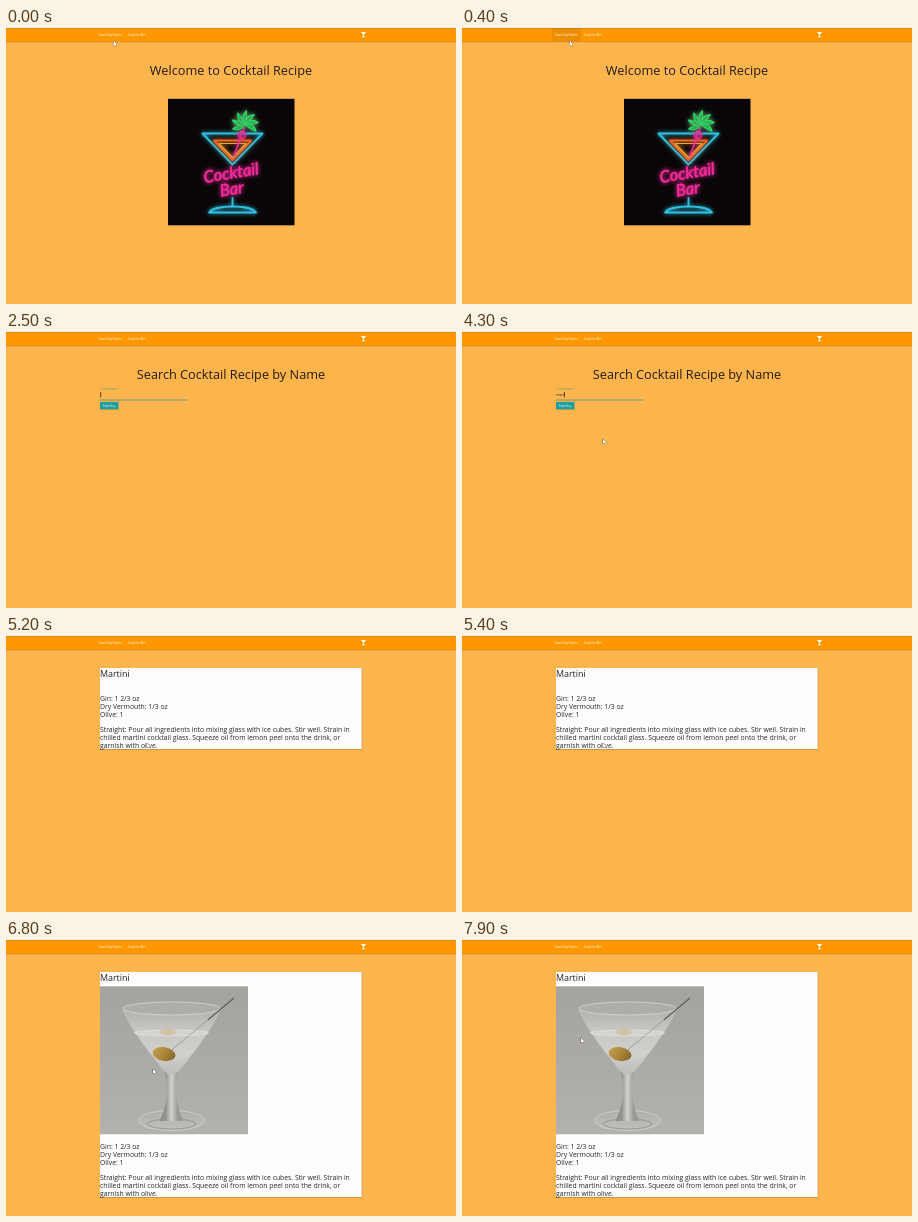
Write an HTML page with a canvas that moves like this. It is 450 px wide and 276 px high and loops after 8 s.

```html
<!DOCTYPE html>
<html lang="en">
<head>
<meta charset="utf-8">
<title>Cocktail Recipe</title>
<style>
html, body { margin: 0; width: 100%; height: 100%; overflow: hidden; background: #fcb54d; }
canvas { display: block; width: 450px; height: 276px; }
</style>
</head>
<body>
<canvas id="stage" width="450" height="276"></canvas>
<script>
const ctx = document.getElementById('stage').getContext('2d');
const LOOP = 8000, STEP = 100;
const SANS = '"Open Sans", "Noto Sans", sans-serif';
const INK = '#241b14';

const SEARCH_AT = 1600, FOCUS_AT = 2300, TYPE_AT = 3700, CARD_AT = 5200, PHOTO_AT = 5600;
const KEY_GAP = 200;

// Arrival times of the pointer; it travels at one speed and rests in between.
const MS_PER_PX = 7;
const STOPS = [
  { at: 1600, x: 115, y: 50 },
  { at: 2000, x: 80, y: 61 },
  { at: 2800, x: 141, y: 107 },
  { at: 5700, x: 149, y: 110 },
  { at: 6100, x: 180, y: 139 },
  { at: 7400, x: 65, y: 104 },
  { at: 7900, x: 119, y: 98 }
];

const clamp = v => Math.min(1, Math.max(0, v));
const mix = (a, b, k) => a + (b - a) * k;

function text(str, x, y, size, color, align = 'left') {
  ctx.font = `${size}px ${SANS}`;
  ctx.textAlign = align;
  ctx.fillStyle = color;
  ctx.fillText(str, x, y);
}

function rect(x, y, w, h, color) {
  ctx.fillStyle = color;
  ctx.fillRect(x, y, w, h);
}

function stroke(color, width) {
  ctx.strokeStyle = color;
  ctx.lineWidth = width;
  ctx.stroke();
}

function fill(color) {
  ctx.fillStyle = color;
  ctx.fill();
}

function line(x0, y0, x1, y1, color, width) {
  ctx.beginPath();
  ctx.moveTo(x0, y0);
  ctx.lineTo(x1, y1);
  stroke(color, width);
}

// Isosceles triangle with a level top edge, pointing down.
function cone(x, top, halfWidth, height) {
  ctx.beginPath();
  ctx.moveTo(x - halfWidth, top);
  ctx.lineTo(x + halfWidth, top);
  ctx.lineTo(x, top + height);
  ctx.closePath();
}

function oval(x, y, rx, ry, angle = 0) {
  ctx.beginPath();
  ctx.ellipse(x, y, rx, ry, angle, 0, Math.PI * 2);
}

function gradient(x0, y0, x1, y1, ...colors) {
  const g = ctx.createLinearGradient(x0, y0, x1, y1);
  colors.forEach((c, i) => g.addColorStop(i / (colors.length - 1), c));
  return g;
}

function drawNav(t) {
  rect(0, 0, 450, 13.5, '#ff9800');
  rect(0, 0, 450, 0.5, 'rgba(110,70,10,.4)');
  rect(0, 13.5, 450, 1.5, gradient(0, 13.5, 0, 15, 'rgba(150,85,0,.4)', 'rgba(150,85,0,0)'));
  if (t < SEARCH_AT) rect(90, 0, 29, 13.5, `rgba(0,0,0,${0.07 * clamp(t / 400)})`);
  text('Search by Name', 93, 8, 3.03, '#fff');
  text('Surprise Me!', 122, 8, 3.03, '#fff');
  cone(357.5, 4, 2.5, 3.2);
  fill('#fff');
  line(357.5, 6, 357.5, 9, '#fff', 0.8);
  line(355.8, 8.8, 359.2, 8.8, '#fff', 0.8);
}

function neon(color, width) {
  ctx.shadowColor = color;
  stroke(color, width);
}

function drawPalm(x, y) {
  const leaves = 7;
  for (let i = 0; i < leaves; i++) {
    ctx.save();
    ctx.translate(x, y);
    ctx.rotate(mix(-3.6, 0.5, i / (leaves - 1)));
    ctx.beginPath();
    ctx.moveTo(0, 0);
    ctx.quadraticCurveTo(7, -5, 13, 1);
    ctx.quadraticCurveTo(7, 2, 0, 0);
    fill('#0f8f3c');
    neon('#27dd62', 1.3);
    ctx.restore();
  }
}

function drawNeonWords() {
  ctx.save();
  ctx.translate(226, 150.5);
  ctx.rotate(-0.16);
  ctx.font = 'italic 16.5px "Lato", sans-serif';
  ctx.textAlign = 'center';
  ctx.fillStyle = ctx.strokeStyle = ctx.shadowColor = '#f22c9c';
  ctx.lineWidth = 0.6;
  ['Cocktail', 'Bar'].forEach((word, i) => {
    ctx.fillText(word, -2 * i, 16 * i);
    ctx.strokeText(word, -2 * i, 16 * i);
  });
  ctx.restore();
}

function drawNeonSign() {
  const x = 226.5, cyan = '#2fbfe0', pink = '#ef2b94';
  rect(162, 70.8, 126.5, 126.5, '#0a0607');
  ctx.save();
  ctx.lineJoin = ctx.lineCap = 'round';
  ctx.shadowBlur = 4;

  cone(x, 105.5, 30, 31);
  neon(cyan, 1.8);
  cone(x, 112.5, 18.5, 19.5);
  neon('#ee6424', 2);
  cone(x, 115.5, 13.5, 14);
  neon('#e9a83a', 1.2);

  ctx.shadowColor = cyan;
  line(x, 170, x, 178, cyan, 1.8);
  ctx.beginPath();
  ctx.moveTo(x - 23.5, 184.5);
  ctx.bezierCurveTo(x - 18, 176.5, x + 18, 176.5, x + 23.5, 184.5);
  ctx.closePath();
  neon(cyan, 1.8);

  ctx.shadowColor = pink;
  line(238, 100, 228, 128, pink, 1.6);
  oval(236, 107, 3.5, 3.5);
  neon(pink, 1.5);
  drawPalm(239, 96);
  drawNeonWords();
  ctx.restore();
}

function drawTitle(str) {
  text(str, 225, 47.2, 12.72, INK, 'center');
}

function drawHome() {
  drawTitle('Welcome to Cocktail Recipe');
  drawNeonSign();
}

function drawField(t) {
  const rise = clamp((t - FOCUS_AT + STEP) / 200);
  text('Cocktail Name', 94.5, mix(64, 58, rise), mix(3.3, 2.6, rise), '#6f9f70');
  rect(94, 67.5, 87, 1, 'rgba(38,136,125,.65)');
  const typed = 'martini'.slice(0, Math.max(0, Math.floor((t - TYPE_AT) / KEY_GAP) + 1));
  text(typed, 94.3, 64.3, 3.5, INK);
  if (t < 3300 || typed) rect(94.3 + ctx.measureText(typed).width, 60, 0.8, 5.5, '#3b2a16');
}

function drawSearch(t) {
  drawTitle('Search Cocktail Recipe by Name');
  if (t >= FOCUS_AT) {
    drawField(t);
  } else {
    text('Cocktail Name', 96, 64.5, 3.1, '#d2a45a');
    rect(94, 67.5, 87, 0.8, '#e0a450');
  }
  rect(94, 77, 18.5, 0.8, 'rgba(110,75,20,.4)');
  rect(94, 70, 18.5, 7.2, '#209fa0');
  text('Search ▸', 97, 74.8, 3.1, '#fff');
}

function drawGlassFoot(x) {
  oval(x, 180.5, 33, 10);
  fill(gradient(0, 170, 0, 191, '#b0aeab', '#c2c0bd'));
  stroke('#cfcdca', 0.9);
  oval(x, 184, 24, 5);
  stroke('rgba(120,118,115,.5)', 1);

  ctx.beginPath();
  ctx.moveTo(x - 7, 130);
  ctx.quadraticCurveTo(x, 156, x - 12, 181);
  ctx.lineTo(x + 12, 181);
  ctx.quadraticCurveTo(x, 156, x + 7, 130);
  fill(gradient(x - 6, 0, x + 6, 0, '#92908e', '#d2d0cd', '#9b9996'));
}

function drawBowl(x, rim, level) {
  const halfWidth = 48.5;
  ctx.beginPath();
  ctx.moveTo(x - halfWidth, rim);
  ctx.quadraticCurveTo(x - 44, 86, x - 8, 130);
  ctx.quadraticCurveTo(x, 138, x + 8, 130);
  ctx.quadraticCurveTo(x + 44, 86, x + halfWidth, rim);
  ctx.closePath();
  fill(gradient(0, rim, 0, 136, '#b2b1ae', '#c8c7c4', '#d2d0cc', '#bcbab7'));
  stroke('#c6c4c1', 0.8);
  oval(x, level, 37, 3);
  fill('#d6d4d0');
  stroke('#e2e1de', 0.7);
  oval(x, rim, halfWidth, 6.5);
  fill('#aeadaa');
  stroke('#d4d3d0', 0.9);
}

function drawMartini() {
  const left = 94, top = 46.3, size = 148, x = 165.5;
  rect(left, top, size, size, gradient(0, top, 0, top + size, '#a5a3a0', '#b3b1ad'));
  drawGlassFoot(x);
  drawBowl(x, 68.5, 93);
  oval(162, 92, 8, 3.4);
  fill('#cfc4a6');
  line(228, 58, 162, 113, 'rgba(105,102,98,.5)', 0.9);
  line(228, 58, 202, 79.7, '#62605e', 1.2);
  oval(158, 114, 11.5, 6.8, 0.15);
  fill(gradient(148, 108, 168, 121, '#c3a055', '#ad8537', '#86652c'));
}

function drawCard(t) {
  const hasPhoto = t >= PHOTO_AT;
  const shift = hasPhoto ? 144 : 0;
  const ink = '#262626';
  rect(94, 32, 262.2, 81.7 + shift, 'rgba(115,75,20,.45)');
  rect(94, 32, 261.7, 81 + shift, '#fdfdfd');
  text('Martini', 94, 41.2, 8.9, ink);
  if (hasPhoto) drawMartini();
  [
    'Gin: 1 2/3 oz',
    'Dry Vermouth: 1/3 oz',
    'Olive: 1',
    '',
    'Straight: Pour all ingredients into mixing glass with ice cubes. Stir well. Strain in',
    'chilled martini cocktail glass. Squeeze oil from lemon peel onto the drink, or',
    'garnish with olive.'
  ].forEach((str, i) => text(str, 94, 65 + 7.78 * i + shift, 6.84, ink));
}

function pointerAt(t) {
  let { x, y } = STOPS[0];
  for (const stop of STOPS) {
    const travel = MS_PER_PX * Math.hypot(stop.x - x, stop.y - y) || 1;
    const k = clamp(1 + (t - stop.at) / travel);
    x = mix(x, stop.x, k);
    y = mix(y, stop.y, k);
    if (k < 1) break;
  }
  return { x, y };
}

function drawHand(x, y) {
  ctx.beginPath();
  ctx.roundRect(x, y, 1.2, 3, 0.5);
  ctx.roundRect(x - 0.7, y + 2, 3, 2.6, 0.8);
  stroke('#5a4a38', 0.7);
  fill('#fff');
}

function drawArrow(x, y) {
  ctx.beginPath();
  ctx.moveTo(x, y);
  ctx.lineTo(x, y + 4.3);
  ctx.lineTo(x + 1.9, y + 4.6);
  ctx.lineTo(x + 3.1, y + 3);
  ctx.closePath();
  stroke('#4b4034', 0.8);
  fill('#fff');
}

function drawPointer(t) {
  const overField = t >= FOCUS_AT && t <= 2500;
  if (overField) return;
  if (t < SEARCH_AT) return drawHand(108, 13);
  const { x, y } = pointerAt(t);
  drawArrow(x, y);
}

function draw(t) {
  rect(0, 0, 450, 276, '#fcb54d');
  drawNav(t);
  if (t < SEARCH_AT) drawHome();
  else if (t < CARD_AT) drawSearch(t);
  else drawCard(t);
  drawPointer(t);
}

const start = performance.now();
function tick() {
  const t = (performance.now() - start) % LOOP;
  draw(Math.floor(t / STEP) * STEP);
  requestAnimationFrame(tick);
}
tick();
</script>
</body>
</html>
```
